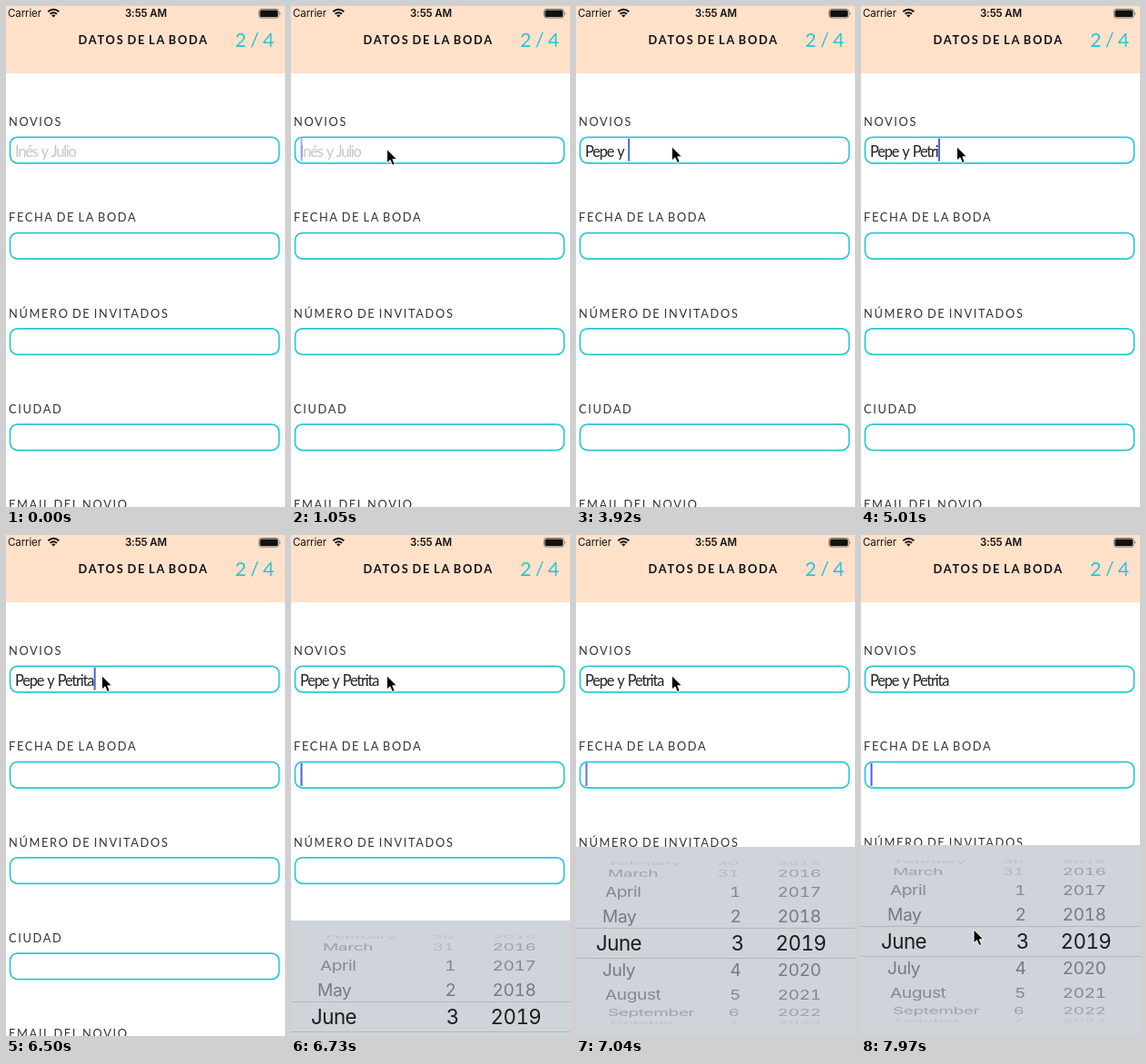
Recreate the animation shown at these times as an HTML page. Size 307x551 px, loop 8000 ms.

```html
<!DOCTYPE html>
<html lang="es">
<head>
<meta charset="utf-8">
<title>Datos de la boda</title>
<style>
  html, body { margin: 0; width: 100%; height: 100%; overflow: hidden; background: #fff; }
  svg { display: block; width: 307px; height: 551px; }
  text { white-space: pre; }
  .hand { font-family: Lato, "Open Sans", sans-serif; }
  .label { font-size: 12.8px; letter-spacing: 1.65px; word-spacing: -1.5px; fill: #333; }
  .title { font-size: 12.8px; font-weight: 700; letter-spacing: 1.75px; word-spacing: -1.8px; fill: #111; }
  .page { font-size: 21.5px; letter-spacing: 4.3px; fill: #2cc3d6; }
  .entry { font-size: 16.4px; letter-spacing: -1.2px; word-spacing: 1.6px; fill: #222; }
  .hint { fill: #c6c6ca; }
  .field { fill: #fff; stroke: #2cc6d4; stroke-width: 1.7; }
  .sys { font-family: Inter, Roboto, sans-serif; font-size: 11.5px; letter-spacing: -.1px; fill: #111; }
  .row { font-family: Inter, Roboto, sans-serif; font-size: 19.2px; letter-spacing: -.45px; font-variant-numeric: tabular-nums; }
  .row.now { font-size: 22.3px; letter-spacing: -.5px; }
  #caret { fill: #4a62dc; }
</style>
</head>
<body>
<svg viewBox="0 0 307 551">
  <rect width="307" height="551" fill="#fff"/>
  <rect width="307" height="74" fill="#ffe1ca"/>

  <text class="sys" x="2" y="12.3">Carrier</text>
  <g fill="none" stroke="#111" stroke-width="2">
    <path d="M46.3 6.2Q52.3 1.2 58.3 6.2M48.6 8.8Q52.3 5.6 56 8.8"/>
    <path d="M50.1 10.3Q52.3 8.6 54.5 10.3L52.3 12.6Z" fill="#111" stroke="none"/>
  </g>
  <text class="sys" x="154" y="12.3" text-anchor="middle" font-weight="600">3:55 AM</text>
  <rect x="278.5" y="3.5" width="21.5" height="9.5" rx="2.4" fill="none" stroke="#555" stroke-width=".8"/>
  <rect x="279.5" y="4.5" width="19.5" height="7.5" rx="1.5" fill="#111"/>
  <path d="M301.3 6.5q1.6 1.7 0 3.5z" fill="#444"/>

  <text class="hand title" x="79.5" y="41.5">DATOS DE LA BODA</text>
  <text class="hand page" x="252" y="45">2/4</text>

  <g id="form"></g>
  <text id="entry" class="hand entry" x="10" y="166"></text>
  <rect id="caret" width="2" height="25"/>

  <g id="picker">
    <rect width="307" height="215" fill="#cfd3da"/>
    <path d="M0 89.5H307M0 122.5H307" stroke="#b1b5bc"/>
  </g>

  <path id="mouse" d="M0 0V15.2L3.5 12L6 17.8L8.7 16.6L6.3 11H11Z"
        fill="#000" stroke="#fff" stroke-width="1" stroke-linejoin="round"/>
</svg>
<script>
const LOOP = 8000;
const NAMES = "Pepe y Petrita", HINT = "Inés y Julio";
const LABELS = ["NOVIOS", "FECHA DE LA BODA", "NÚMERO DE INVITADOS", "CIUDAD", "EMAIL DEL NOVIO"];
const MONTHS = ["February", "March", "April", "May", "June", "July", "August", "September", "October"];
const PITCH = 105.25, PICKER_TOP = 341, PICKER_SIZE = 210;

const $ = id => document.getElementById(id);
const entry = $("entry"), caret = $("caret"), picker = $("picker"), mouse = $("mouse");

function add(parent, tag, attrs, text) {
  const el = document.createElementNS("http://www.w3.org/2000/svg", tag);
  for (const key in attrs) el.setAttribute(key, attrs[key]);
  if (text !== undefined) el.textContent = text;
  return parent.appendChild(el);
}

LABELS.forEach((label, i) => {
  add($("form"), "text", { class: "hand label", x: 3, y: 132 + PITCH * i }, label);
  add($("form"), "rect", { class: "field", x: 4.5, y: 144.3 + PITCH * i, width: 296, height: 28.5, rx: 8 });
});

// Rows sit on a cylinder seen from the front.
const LEFT = [22, 29, 32, 35, 38], RIGHT = [184.5, 181.5, 181, 179.5, 179];
const SHADE = ["#1b1c1e", "#777a80", "#85888e", "#9ea1a8", "#bcc0c7"];
MONTHS.forEach((month, n) => {
  const i = n - 4, far = Math.abs(i), angle = i * 19.4 * Math.PI / 180;
  const row = add(picker, "g", {
    class: far ? "row" : "row now", fill: SHADE[far],
    transform: `translate(0 ${106 + 90 * Math.sin(angle)}) scale(1 ${Math.cos(angle)})`
  });
  const day = i < -2 ? 34 + i : 3 + i;
  add(row, "text", { x: LEFT[far], dy: ".36em" }, month);
  // June has 30 days, so a 31 is greyed out.
  add(row, "text", { x: RIGHT[far], dy: ".36em", "text-anchor": "end", opacity: day > 30 ? .5 : 1 }, day);
  add(row, "text", { x: far ? 221.5 : 219.5, dy: ".36em" }, 2019 + i);
});

const TYPED = [[0, 0], [2670, 1], [2900, 2], [2980, 3], [3150, 4], [3230, 5], [3390, 6], [3920, 7],
  [4080, 8], [4540, 9], [4690, 10], [4860, 11], [5010, 12], [5330, 13], [5800, 14]];
const BLINK = [[0, 0], [600, 1], [1050, .5], [1130, 0], [1600, .5], [1670, 1], [1980, .7], [2060, .35],
  [2150, 0], [2670, 1], [5950, .5], [6030, 0], [6430, .5], [6500, 1], [7040, .9],
  [7120, .45], [7200, 0], [7650, .5], [7730, 1]];

const at = (track, t) => track.reduce((value, [time, v]) => t >= time ? v : value, 0);

// Index of the held step, from 0 to count - 1.
function step(t, start, end, count) {
  const k = Math.floor((t - start + 7) / (end - start) * (count - 1));
  return Math.max(0, Math.min(count - 1, k));
}

function mousePlace(t) {
  if (t < 1050) {
    const left = Math.pow(1 - step(t, 70, 740, 10) / 9, 2);
    return [106 + 134 * left, 161 + 330 * left];
  }
  if (t < 1130) return [105.6, 157.5];
  if (t < 7650) return [105.5, 154.8];
  const p = (step(t, 7650, 7970, 5) + 1) / 5, e = p * p * (3 - 2 * p);
  return [105.5 + 18.5 * e, 154.8 + 279 * e];
}

// Share of the slide still to go, on a critically damped spring.
function pickerLeft(t) {
  if (t < 6660) return 1.1;
  const held = 6660 + step(t, 6660, 7350, 10) * 690 / 9;
  const w = (held - 6601) * .015;
  return (1 + w) * Math.exp(-w);
}

function draw(t) {
  const count = at(TYPED, t);
  const text = count ? NAMES.slice(0, count) : HINT;
  if (entry.textContent !== text) entry.textContent = text;
  entry.classList.toggle("hint", !count);

  const second = t >= 6660;
  const width = count && !second ? entry.getComputedTextLength() : 0;
  caret.setAttribute("x", 10.5 + width);
  caret.setAttribute("y", second ? 251 : 145.7);
  caret.setAttribute("opacity", at(BLINK, t));

  const top = Math.round(PICKER_TOP + PICKER_SIZE * pickerLeft(t));
  picker.setAttribute("transform", `translate(0 ${top})`);
  mouse.setAttribute("transform", `translate(${mousePlace(t)})`);
  mouse.setAttribute("visibility", t < 70 ? "hidden" : "visible");
}

const begin = performance.now();
function tick() {
  draw((performance.now() - begin) % LOOP);
  requestAnimationFrame(tick);
}
tick();
</script>
</body>
</html>
```
